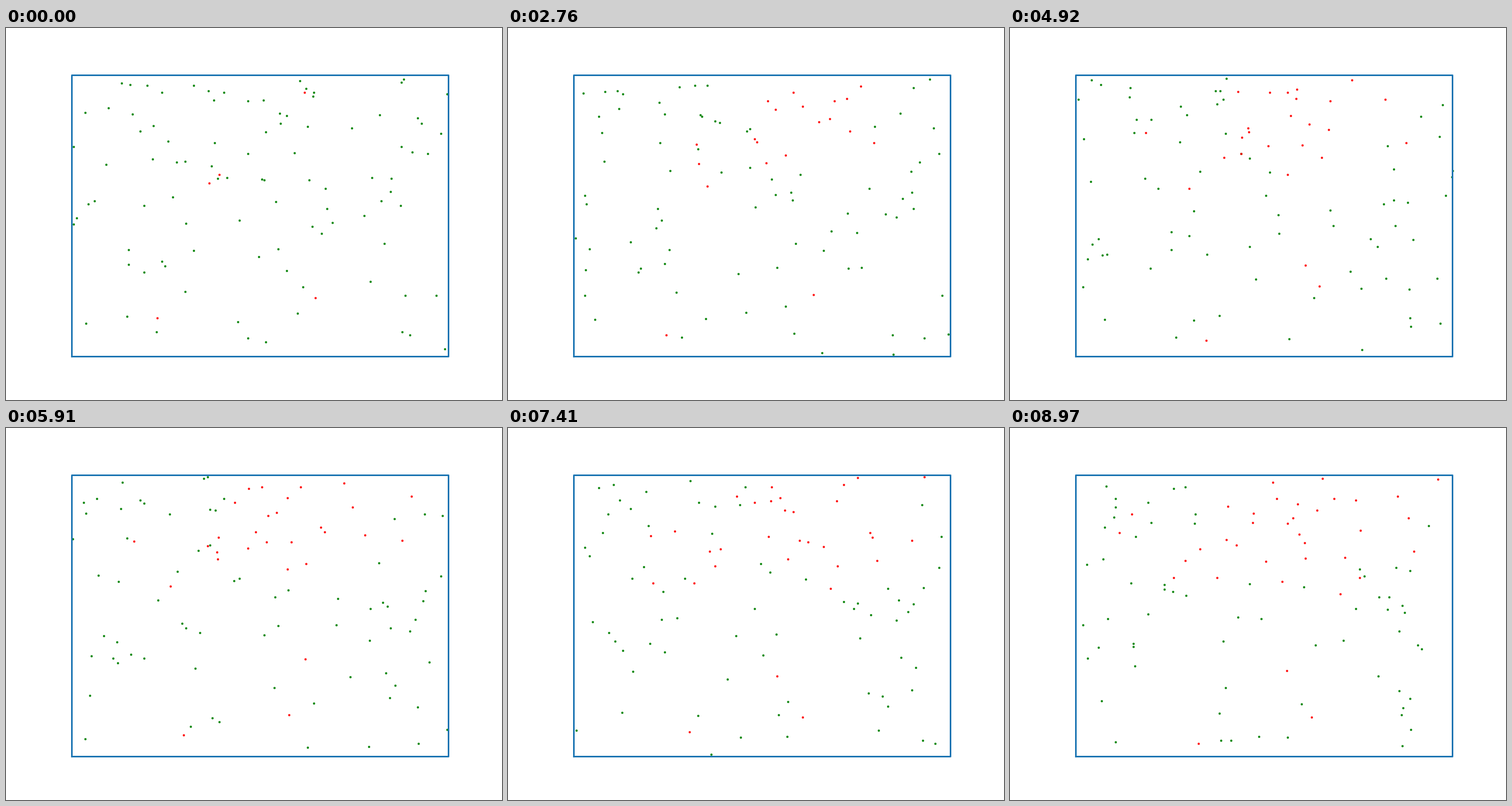
A matplotlib script that plays this animation: 640 px wide and 480 px high, repeating every 9 s.

```python
import numpy as np
import matplotlib.pyplot as plt
from matplotlib.animation import FuncAnimation

FRAMES, INTERVAL = 300, 30
SIDE, COUNT = 100, 100
FIRST_ILL = [(61.7, 94), (39.1, 64.7), (36.4, 61.7), (64.6, 20.9), (22.6, 13.7)]
LAST_ILL = 36


def scatter_start(rng):
    """The first cases at set places, the rest at random, denser towards the top."""
    u, v = rng.random((2, COUNT - len(FIRST_ILL)))
    return np.vstack([FIRST_ILL, np.column_stack([SIDE * u, SIDE * v**0.7])])


def walk(start, rng):
    """Unit steps in four directions; steps out of the box are refused."""
    moves = np.array([(1, 0), (-1, 0), (0, 1), (0, -1)])
    path = [start]
    for _ in range(FRAMES - 1):
        nxt = path[-1] + moves[rng.integers(4, size=len(start))]
        inside = ((nxt >= 0) & (nxt <= SIDE)).all(axis=1)
        path.append(np.where(inside[:, None], nxt, path[-1]))
    return np.array(path)


def spread(paths, rng):
    """Step at which each walker falls ill: a random case infects its nearest neighbour."""
    onset = np.full(COUNT, FRAMES)
    onset[:len(FIRST_ILL)] = 0
    for i, pos in enumerate(paths):
        progress = (i / (FRAMES - 1)) ** 0.6
        cases = len(FIRST_ILL) + int((LAST_ILL - len(FIRST_ILL)) * progress)
        while (onset <= i).sum() < cases:
            carrier = rng.choice(np.flatnonzero(onset <= i))
            gap = np.hypot(*(pos - pos[carrier]).T)
            gap[onset <= i] = np.inf
            onset[gap.argmin()] = i
    return onset


rng = np.random.default_rng(7)
paths = walk(scatter_start(rng), rng)
onset = spread(paths, rng)

fig = plt.figure(figsize=(6.4, 4.8), dpi=100, facecolor="white")
ax = fig.add_axes([0.125, 0.11, 0.775, 0.77])
ax.set(xlim=(-1, SIDE + 1), ylim=(-1, SIDE + 1))
ax.axis("off")

ax.plot([0, SIDE, SIDE, 0, 0], [0, 0, SIDE, SIDE, 0], color="C0", lw=1.5, zorder=3)
well, = ax.plot([], [], "o", color="green", ms=1, zorder=2)
sick, = ax.plot([], [], "o", color="red", ms=1, zorder=2)


def update(i):
    red = onset <= i
    well.set_data(*paths[i][~red].T)
    sick.set_data(*paths[i][red].T)
    return well, sick


anim = FuncAnimation(fig, update, frames=FRAMES, interval=INTERVAL,
                     repeat=True, repeat_delay=0)
plt.show()
```
